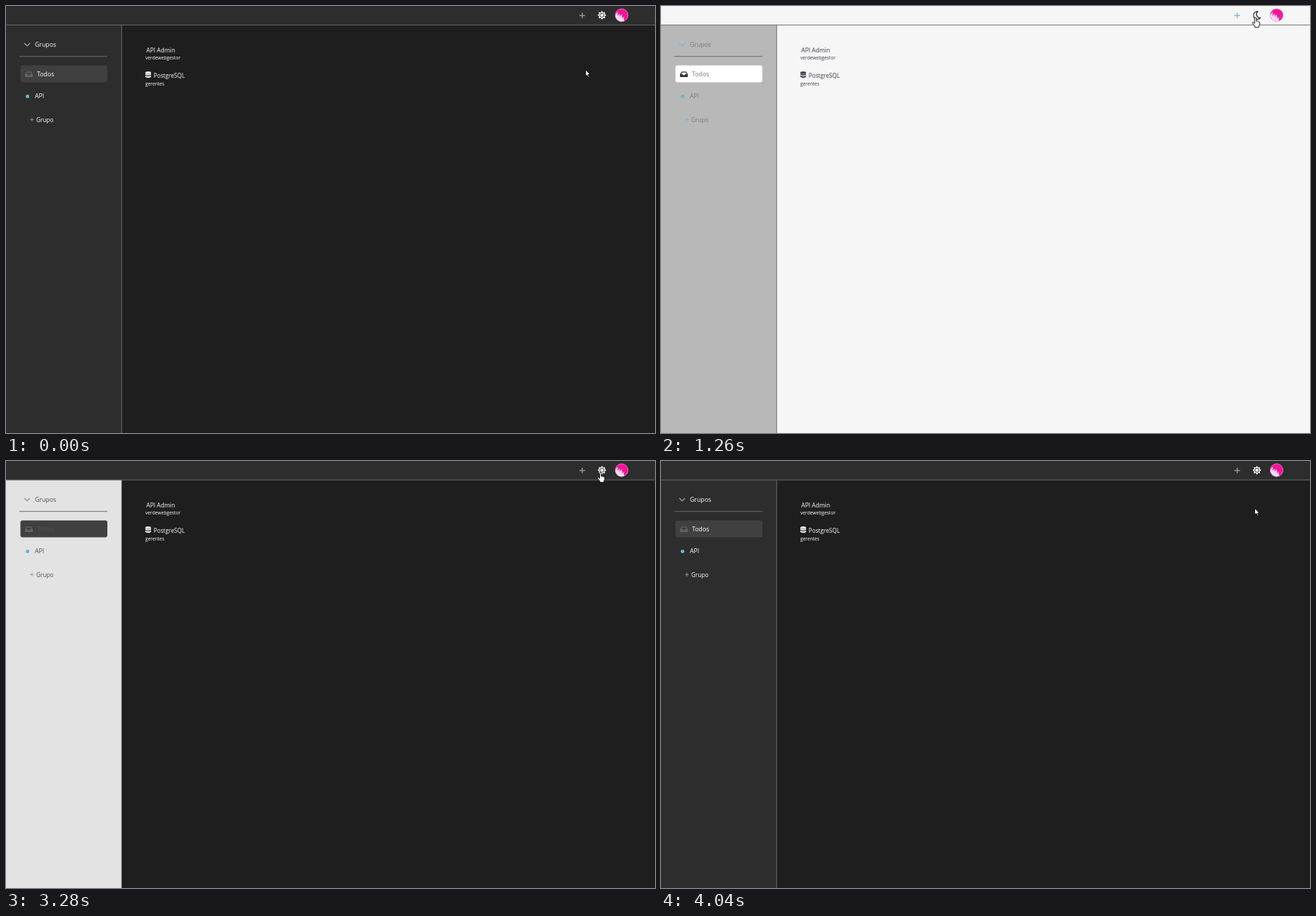
Recreate the animation shown at these times as an HTML page. Size 922 by 607 pixels, loop 4970 ms.

```html
<!DOCTYPE html>
<html lang="pt">
<head>
<meta charset="utf-8">
<title>Grupos</title>
<style>
  html, body { margin: 0; width: 100%; height: 100%; overflow: hidden; background: #1e1e1e; }
  svg { display: block; width: 100%; height: 100%; }
  text { font-family: "Open Sans", "Noto Sans", sans-serif; white-space: pre; }
  .line { fill: none; stroke: #6b6b6b; }
  .accent { fill: none; stroke: var(--accent); }
  .ink { fill: var(--ink); }
  .side { fill: var(--side-ink); }
</style>
</head>
<body>
<svg id="stage" viewBox="0 0 922 607">
  <rect width="922" height="607" fill="var(--main)"/>
  <rect y="27" width="164" height="580" fill="var(--side)"/>
  <rect width="922" height="27" fill="var(--head)"/>
  <path class="line" d="M0 27H922M164.3 27V607M19 71.7H144"/>

  <path class="accent" stroke-width="1.5" d="M26 52.7l4 4 4-4"/>
  <text class="side" x="41" y="58" font-size="8.75">Grupos</text>
  <rect x="20.5" y="84.6" width="123.5" height="23.8" rx="2.8" fill="var(--item)"/>
  <g fill="none" stroke="var(--tray)" stroke-width="1.3" stroke-linejoin="round">
    <path d="M27.6 97.3l2-3.5h5.8l2 3.5"/>
    <path fill="var(--tray)" d="M27.6 97.4h2.5l1 1.5h2.8l1-1.5h2.5v2.9h-9.8z"/>
  </g>
  <text class="side" x="44" y="100.3" font-size="8.75">Todos</text>
  <circle cx="30.6" cy="128.4" r="2.5" fill="#62b9c9"/>
  <text class="side" x="41" y="130.8" font-size="8.75">API</text>
  <path class="accent" stroke-width=".9" d="M34.2 161.5h5.4M36.9 158.8v5.4"/>
  <text class="side" x="43" y="165" font-size="8.3">Grupo</text>

  <text class="ink" x="199.3" y="65.6" font-size="8.5">API Admin</text>
  <text class="ink" x="198" y="75.7" font-size="6.65">verdewebgestor</text>
  <g class="ink">
    <ellipse cx="202" cy="94.6" rx="4.1" ry="1.6"/>
    <path id="disc" d="M197.9 95.6q4.1 2.5 8.2 0v2q-4.1 2.4-8.2 0z"/>
    <use href="#disc" y="3.1"/>
  </g>
  <text class="ink" x="209.7" y="102.3" font-size="8.25">PostgreSQL</text>
  <text class="ink" x="198" y="112.6" font-size="6.65">gerentes</text>

  <path class="accent" stroke-width="1.4" d="M814.6 13.5h8M818.6 9.5v8"/>
  <g id="sun" transform="translate(846.6 13.1)">
    <path id="rays" fill="#fff"/>
    <circle r="2.9" fill="#fff" stroke="#2d2d2d" stroke-width="1"/>
  </g>
  <path id="moon" fill="none" stroke="#23213c" stroke-width="1.3" stroke-linejoin="round"
    d="M847.8 7.7a5.6 5.6 0 1 0 3.8 9.2a5.3 5.3 0 0 1-3.8-9.2z"/>
  <g>
    <circle cx="874.6" cy="13" r="9.3" fill="#f2169a"/>
    <path fill="#fbd9ee" d="M865.6 14.6q1-4.6 3.6-6.6l-.6 6 3-3.4.4 5 2.4-4 1.6 6.4 1.4-3 .8 6.2q-9.600 3.600-12.600-6.600z"/>
    <circle cx="874.6" cy="13" r="9.1" fill="none" stroke="#f9b4de" stroke-width=".5"/>
  </g>

  <circle id="click" cx="843.6" cy="16.5" r="9.5" fill="#fff00c" opacity=".62"/>
  <g id="cursor" fill="#fff" stroke="#000" stroke-width=".9" stroke-linejoin="round">
    <path id="arrow" d="M0 0V9.600l2.200-2 1.500 3.400 1.500-.7-1.500-3.200h3z"/>
    <path id="hand" d="M-1.200 .5a1.200 1.200 0 0 1 2.400 0V4.500q1.400-.5 1.800.5 1.400-.4 1.700.6 1.400-.2 1.400 1.200V9.300l-1.300 2.200v1.800h-5.600v-1.500L-4 7.700q-.9-1.300.2-1.600.9-.2 1.500.7l1.100 1.100z"/>
  </g>
</svg>
<script>
const LOOP = 4970, TO_LIGHT = 1110, TO_DARK = 3280, FADE = 500;
const $ = id => document.getElementById(id);
const stage = $("stage");

const themes = {
  dark:  { main: "#1e1e1e", head: "#2d2d2d", item: "#404040", accent: "#999", tray: "#626262", ink: "#fff" },
  light: { main: "#f6f6f6", head: "#f6f6f6", item: "#fff", accent: "#7cb6e4", tray: "#333338", ink: "#3c3b4c" }
};
const sideBg = { dark: [45, 45, 45], light: [246, 246, 246] };
const sideInk = { dark: [255, 255, 255], light: [62, 61, 78] };

// Cursor keys: time, x, y of the hotspot
const leave = [
  [3280, 844.5, 17], [3360, 844.5, 17.5], [3430, 844, 19], [3500, 842.5, 23.7],
  [3580, 842, 35], [3660, 842, 48], [3730, 842, 58], [3810, 842.6, 62],
  [3890, 843, 64.5], [3960, 843.3, 66], [4040, 843.5, 67]
];

$("rays").setAttribute("d", "M" + Array.from({ length: 16 }, (_, i) => {
  const r = i % 2 ? 4.3 : 6.3, a = i * Math.PI / 8;
  return (r * Math.cos(a)).toFixed(2) + " " + (r * Math.sin(a)).toFixed(2);
}).join("L") + "z");

const clamp = v => Math.min(1, Math.max(0, v));
const mix = (a, b, k) => a + (b - a) * k;
const rgb = (a, b, k) => `rgb(${a.map((v, i) => Math.round(mix(v, b[i], k)))})`;
const show = (id, on) => $(id).style.display = on ? "" : "none";

// CSS "ease": cubic-bezier(.25, .1, .25, 1)
function ease(x) {
  const curve = (s, p, q) => 3 * s * (1 - s) ** 2 * p + 3 * s * s * (1 - s) * q + s ** 3;
  let lo = 0, hi = 1;
  for (let i = 0; i < 24; i++) {
    const s = (lo + hi) / 2;
    if (curve(s, .25, .25) < x) lo = s; else hi = s;
  }
  return curve(lo, .1, 1);
}

const stepped = ms => Math.floor((ms + 8) / 76.5) * 76.5;

function fade(t) {
  const start = t < TO_DARK ? TO_LIGHT : TO_DARK;
  return t < TO_LIGHT ? 1 : ease(clamp((stepped(t - start) + 50) / FADE));
}

function pointer(t) {
  if (t < 80) return [823.3, 90.5];
  if (t < 620) {
    const k = clamp((stepped(t - 80) / 76.5 + 1) / 7), e = k * k * (3 - 2 * k);
    return [mix(823.3, 844.3, e), mix(90.5, 18, e)];
  }
  if (t < TO_DARK) return [844.5, 17];
  return leave.filter(key => key[0] <= t).pop().slice(1);
}

function draw(t) {
  const light = t >= TO_LIGHT && t < TO_DARK;
  const now = light ? "light" : "dark", before = light ? "dark" : "light";
  const k = fade(t);
  for (const [name, value] of Object.entries(themes[now])) stage.style.setProperty("--" + name, value);
  stage.style.setProperty("--side", rgb(sideBg[before], sideBg[now], k));
  stage.style.setProperty("--side-ink", rgb(sideInk[before], sideInk[now], k));

  show("moon", light);
  show("sun", !light);
  show("click", (t >= 940 && t < TO_LIGHT) || (t >= 3050 && t < TO_DARK));

  const hand = t >= 620 && t < 3580;
  show("hand", hand);
  show("arrow", !hand);
  $("cursor").setAttribute("transform", `translate(${pointer(t)})`);
}

const start = performance.now();
function tick() {
  draw((performance.now() - start) % LOOP);
  requestAnimationFrame(tick);
}
draw(0);
requestAnimationFrame(tick);
</script>
</body>
</html>
```
